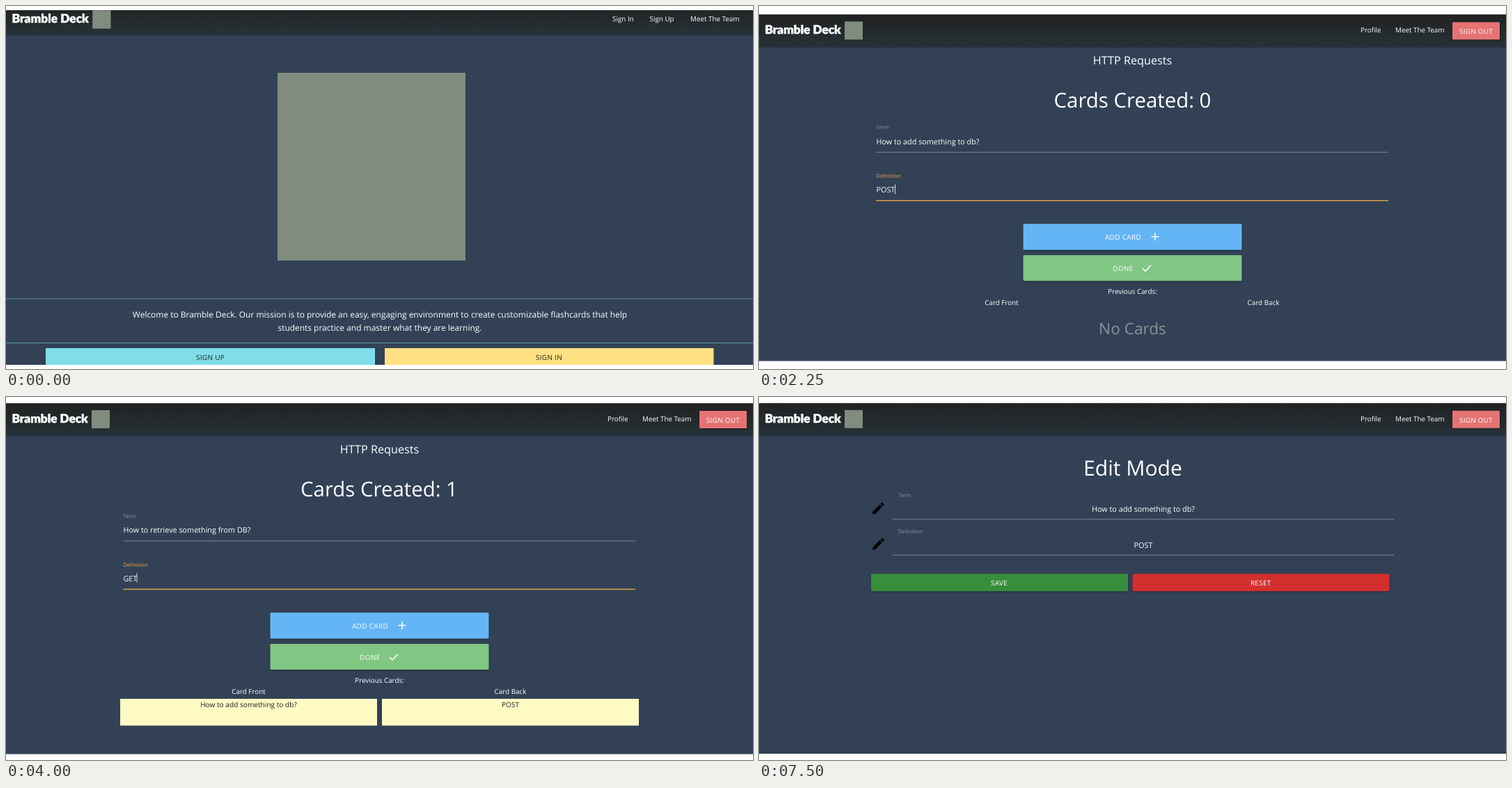
Animation of 1073 by 522 pixels, one loop 8 s. Source, as an HTML page:

```html
<!DOCTYPE html>
<html lang="en">
<head>
<meta charset="utf-8">
<title>Flashcard app tour</title>
<style>
  html, body { margin: 0; width: 100%; height: 100%; overflow: hidden; background: #fff; }
  #stage { display: block; width: 1073px; height: 522px; }
  #reel { animation: reel 8s step-end infinite; }
  @keyframes reel {
    0% { transform: translateX(0); }
    6.25% { transform: translateX(-1073px); }
    28.125% { transform: translateX(-2146px); }
    50% { transform: translateX(-3219px); }
    71.875% { transform: translateX(-4292px); }
    93.75%, 100% { transform: translateX(-5365px); }
  }
  text { font: 10px "Open Sans", "Noto Sans", sans-serif; fill: #fff; text-rendering: geometricPrecision; }
  .mid { text-anchor: middle; }
  .caps { letter-spacing: .03em; text-anchor: middle; }
  .brand { font: 900 17.2px Lato, sans-serif; stroke: #fff; stroke-width: .5px; stroke-linejoin: round; }
  .nav { font-size: 9.85px; }
  .field { font-size: 10.8px; }
  .label { font-size: 7.7px; fill: #8e959d; }
  .row { font-size: 13px; font-weight: 700; text-anchor: middle; }
  .dark { fill: #222; }
  .hint { fill: #9e9e9e; font-size: 10.15px; }
  .page { fill: #324156; }
  .blue { fill: #64b5f6; }
  .green { fill: #81c784; }
  .teal { fill: #26a69a; }
  .red { fill: #e57373; }
  .mark { fill: #808c7d; }
  .raised { filter: drop-shadow(0 1px .8px rgba(0, 0, 0, .35)); }
  .line { stroke: #7d8791; stroke-width: 1; }
  .icon { fill: none; stroke: #fff; stroke-width: 1.6; }
</style>
</head>
<body>
<svg id="stage" viewBox="0 0 1073 522">
  <defs>
    <linearGradient id="bar" x2="0" y2="1">
      <stop stop-color="#212121"/>
      <stop offset="1" stop-color="#263238"/>
    </linearGradient>
    <g id="header">
      <rect width="1073" height="46" fill="url(#bar)" class="raised"/>
    </g>
    <g id="brand">
      <text class="brand" x="8.5" y="28">Bramble Deck</text>
      <rect class="mark" x="123" y="10" width="26" height="26"/>
    </g>
    <!-- measured from the right edge -->
    <g id="links">
      <text class="nav" x="-209" y="26">Profile</text>
      <text class="nav" x="-159" y="26">Meet The Team</text>
      <rect class="red raised" x="-77" y="11" width="68" height="25" rx="1"/>
      <text class="caps" x="-43" y="28" style="font-size:9.85px">SIGN OUT</text>
    </g>
    <g id="smallNav">
      <use href="#header"/>
      <use href="#brand"/>
      <use href="#links" x="1073"/>
    </g>
    <g id="largeNav">
      <use href="#header"/>
      <use href="#brand" transform="scale(1.01)"/>
      <use href="#links" transform="translate(1073) scale(1.01)"/>
    </g>
    <path id="trash" transform="scale(1.6) translate(-12 -12)" d="M6 19c0 1.1.9 2 2 2h8c1.1 0 2-.9 2-2V7H6zM19 4h-3.5l-1-1h-5l-1 1H5v2h14z" fill="#fff"/>
    <path id="pencil" transform="scale(.92) translate(-12 -12)" d="M3 17.25V21h3.75L17.8 9.94l-3.75-3.75zM20.7 7.04c.4-.4.4-1 0-1.4l-2.33-2.35c-.4-.4-1-.4-1.4 0l-1.84 1.83 3.75 3.75z"/>
    <g id="remove">
      <rect class="red raised" x="-22.3" y="-19" width="44.6" height="38" rx="1.5"/>
      <use href="#trash"/>
    </g>
    <g id="form">
      <use href="#smallNav"/>
      <text class="mid" x="536.5" y="72" style="font-size:16.2px">HTTP Requests</text>
      <text class="label" x="168.5" y="165">Term</text>
      <path class="line" d="M168.5 198H904"/>
      <text class="label" x="168.5" y="234.5" style="fill:#f3a14a">Definition</text>
      <path d="M168.5 267.5H904" stroke="#dba448" stroke-width="1.5"/>
      <rect class="blue raised" x="379.5" y="301" width="314" height="37.5" rx="1.5"/>
      <text class="caps" x="523" y="324">ADD CARD</text>
      <path class="icon" d="M563.5 319.5h11M569 314v11"/>
      <rect class="green raised" x="379.5" y="346" width="314" height="37" rx="1.5"/>
      <text class="caps" x="523" y="369">DONE</text>
      <path class="icon" d="M551 365l4 4 8-8.5"/>
      <text class="nav mid" x="536.5" y="402">Previous Cards:</text>
      <text class="nav mid" x="348.5" y="418">Card Front</text>
      <text class="nav mid" x="724.5" y="418">Card Back</text>
    </g>
    <g id="turtle">
      <circle cx="274.5" cy="143.5" r="82.5" fill="#ffd021"/>
      <g fill="#00a878">
        <rect x="262" y="68" width="26" height="36" rx="10"/>
        <rect x="218" y="94" width="28" height="17" rx="8" transform="rotate(32 232 102)"/>
        <rect x="303" y="94" width="28" height="17" rx="8" transform="rotate(-32 317 102)"/>
      </g>
      <circle cx="274.5" cy="138" r="48.5" fill="#e8871e"/>
      <circle cx="274.5" cy="138" r="40" fill="#b0611a"/>
      <path d="M259 98l5 13h21l5-13M264 111l-13 22M285 111l13 22M251 133l-16-3M298 133l16-3" fill="none" stroke="#e8871e" stroke-width="4"/>
      <path d="M274.5 68h4q9 0 9 10v13q13 4 19 10l8-7q8-2 14 4 2 6-4 10l-6 4q5 12 5 26h-49z" opacity=".22"/>
    </g>
  </defs>

  <g id="reel">
    <!-- welcome -->
    <svg width="1073" height="522">
      <svg y="6" width="1073" height="510">
        <rect class="page" width="1073" height="510"/>
        <use href="#header" y="-11"/>
        <use href="#brand" transform="translate(0 -9.8) scale(1.01)"/>
      </svg>
      <text class="nav" x="871" y="22">Sign In</text>
      <text class="nav" x="924.5" y="22">Sign Up</text>
      <text class="nav" x="983" y="22">Meet The Team</text>
      <rect class="mark" x="390" y="96" width="270" height="270"/>
      <path d="M0 421H1073M0 484.5H1073" stroke="#5696a0"/>
      <g class="mid">
        <text x="537" y="448" style="font-size:11.96px">Welcome to Bramble Deck. Our mission is to provide an easy, engaging environment to create customizable flashcards that help</text>
        <text x="537" y="466.5" style="font-size:11.96px">students practice and master what they are learning.</text>
      </g>
      <rect x="57" y="492" width="473" height="24" fill="#80deea"/>
      <rect x="544" y="492" width="472.5" height="24" fill="#ffe082"/>
      <text class="caps dark" x="293.5" y="509">SIGN UP</text>
      <text class="caps dark" x="780" y="509">SIGN IN</text>
    </svg>

    <!-- profile with dialog -->
    <svg x="1073" width="1073" height="522">
      <svg width="1073" height="516.5">
        <rect class="page" y="5.5" width="1073" height="511"/>
        <use href="#largeNav" y="5.5"/>
        <use href="#turtle"/>
        <text x="420" y="139" style="font-size:19.8px">velvetPaddler</text>
        <g fill="#5c9a62">
          <rect x="161" y="367" width="564" height="64" rx="1.5"/>
          <rect x="161" y="462.5" width="564" height="64" rx="1.5"/>
        </g>
        <g fill="#d65c5c">
          <rect x="747.5" y="367" width="165" height="64" rx="1.5"/>
          <rect x="747.5" y="462.5" width="165" height="64" rx="1.5"/>
        </g>
        <text class="row" x="443" y="405">asdf</text>
        <text class="row" x="443" y="500">Party</text>
        <use href="#trash" x="830" y="399"/>
        <use href="#trash" x="830" y="494.5"/>
        <text x="161" y="453.5" style="font-size:10.1px">Created : 11 days ago</text>
        <rect y="5.5" width="1073" height="511" opacity=".65"/>
      </svg>
      <rect x="108.5" y="133.5" width="868.5" height="254.5" rx="14" fill="#fff"/>
      <text class="mid" x="959" y="155.5" style="font-size:12px;font-weight:700;fill:#c8c8c8">x</text>
      <text class="hint" x="126" y="182">Create Category</text>
      <text class="hint" x="126" y="279">Create Subcategory</text>
      <path d="M126 194.3H959M126 290.5H959" stroke="#adadad"/>
      <text class="mid" x="542.5" y="223" style="font-size:10.13px;fill:#f44336">Please input a category title</text>
      <rect class="green raised" x="356" y="324.5" width="373" height="39" rx="1.5"/>
      <text class="caps" x="542.5" y="348.5" style="font-size:10.2px">CREATE CARD</text>
    </svg>

    <!-- first card -->
    <svg x="2146" width="1073" height="522">
      <rect class="page" y="12.5" width="1073" height="498"/>
      <use href="#form" y="12.3"/>
      <text class="mid" x="536.5" y="146" style="font-size:29.4px">Cards Created: 0</text>
      <text class="field" x="168.5" y="198.5">How to add something to db?</text>
      <text class="field" x="168.5" y="268">POST</text>
      <path d="M195.5 256.5v14" stroke="#fff" stroke-width=".8"/>
      <text class="mid" x="536.5" y="472" style="font-size:22.6px;fill:#8e9297">No Cards</text>
    </svg>

    <!-- second card -->
    <svg x="3219" width="1073" height="522">
      <rect class="page" y="9" width="1073" height="504.5"/>
      <use href="#form" y="9"/>
      <text class="mid" x="536" y="143" style="font-size:29.4px">Cards Created: 1</text>
      <text class="field" x="168.5" y="195">How to retrieve something from DB?</text>
      <text class="field" x="168.5" y="265">GET</text>
      <path d="M188 253v14" stroke="#fff" stroke-width=".8"/>
      <path d="M164 434h369v38.5h-369zM540 434h369v38.5h-369z" fill="#fff9c4"/>
      <text class="mid dark" x="348.5" y="446" style="font-size:10.13px">How to add something to db?</text>
      <text class="mid dark" x="724.5" y="446">POST</text>
    </svg>

    <!-- card list -->
    <svg x="4292" width="1073" height="522">
      <svg width="1073" height="515.5">
        <rect class="page" y="7.5" width="1073" height="508"/>
        <use href="#largeNav" y="7.5"/>
        <g class="mid">
          <text x="537" y="114" style="font-size:35.4px">HTTP Requests</text>
          <text x="537" y="168" style="font-size:28.6px">Cards: 4</text>
        </g>
        <path class="blue raised" d="M169 190.5h297.5V240H169zM482 190.5h297.5V240H482z"/>
        <path class="teal raised" d="M169 256h297.5v106.5H169zM482 256h297.5v106.5H482zM169 378.3h297.5v106.5H169zM482 378.3h297.5v106.5H482zM169 500.6h297.5v106.5H169zM482 500.6h297.5v106.5H482z"/>
        <g class="mid">
          <text x="317.5" y="219.5">Term</text>
          <text x="631" y="219.5">Definition</text>
          <text x="317.5" y="313.5" style="font-size:10.2px">How to add something to db?</text>
          <text x="631" y="313.5">POST</text>
          <text x="317.5" y="435.7" style="font-size:10.2px">How to retrieve something from db?</text>
          <text x="631" y="435.7">GET</text>
        </g>
        <use href="#remove" x="850" y="312"/>
        <use href="#remove" x="850" y="434"/>
      </svg>
    </svg>

    <!-- edit mode -->
    <svg x="5365" width="1073" height="522">
      <rect class="page" y="9" width="1073" height="504"/>
      <use href="#smallNav" y="8.8"/>
      <text class="mid" x="537" y="113" style="font-size:30.1px">Edit Mode</text>
      <text class="label" x="200" y="144">Term</text>
      <text class="label" x="200" y="195.5">Definition</text>
      <text class="field mid" x="552" y="165">How to add something to db?</text>
      <text class="field mid" x="552" y="216.5">POST</text>
      <path class="line" d="M192 175.7H912M192 227.2H912"/>
      <use href="#pencil" x="171.5" y="160"/>
      <use href="#pencil" x="171.5" y="211.3"/>
      <rect class="raised" x="161" y="254.3" width="369" height="25" rx="1.5" fill="#388e3c"/>
      <rect class="raised" x="536.5" y="254.3" width="369" height="25" rx="1.5" fill="#d32f2f"/>
      <text class="caps" x="345" y="271">SAVE</text>
      <text class="caps" x="720.8" y="271">RESET</text>
    </svg>
  </g>
</svg>
</body>
</html>
```
